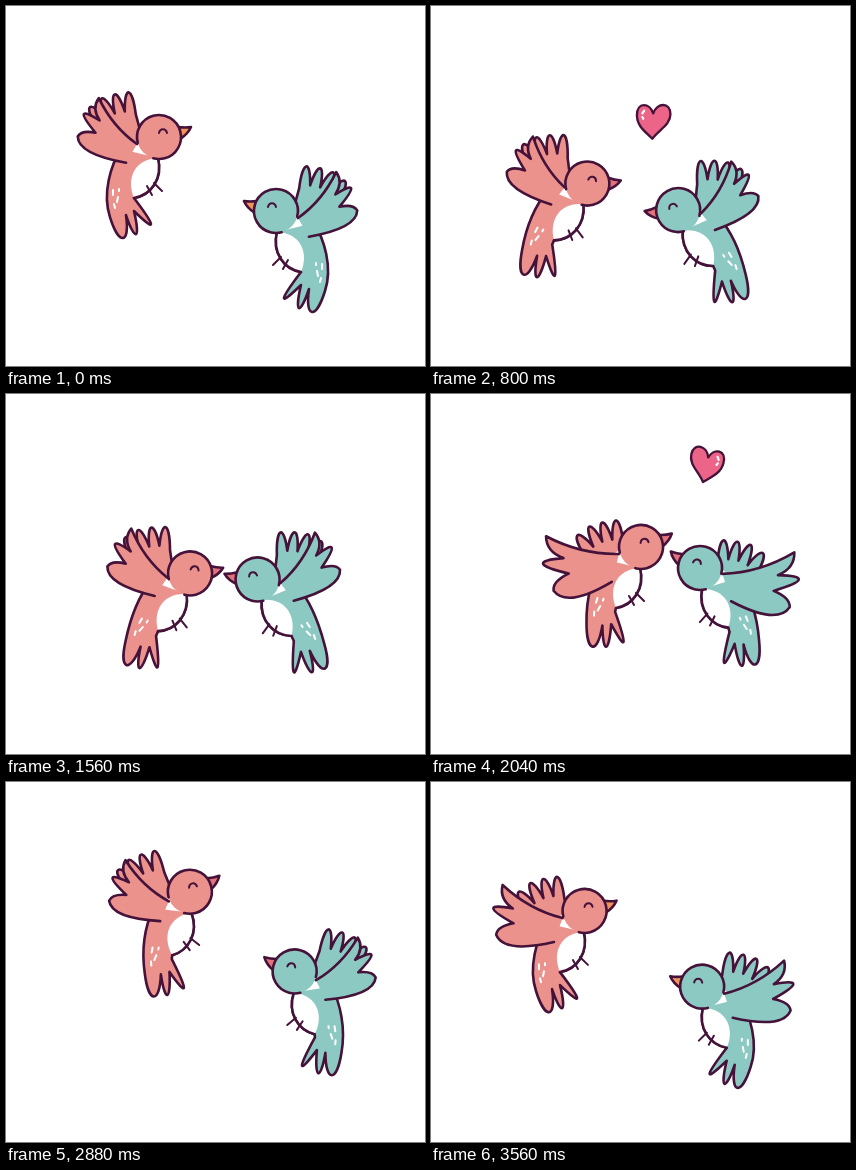
These frames come from a looping animation (419 px wide and 360 px high, 3600 ms). An HTML page with a canvas:

```html
<!DOCTYPE html>
<html lang="en">
<head>
<meta charset="utf-8">
<title>Two birds and a heart</title>
<style>
html, body { margin: 0; width: 100%; height: 100%; overflow: hidden; background: #fff; }
canvas { display: block; }
</style>
</head>
<body>
<canvas id="stage" width="419" height="360"></canvas>
<script>
const ctx = document.getElementById('stage').getContext('2d');
const LOOP = 3600, FLAP = 720, INK = '#45123a';

// Each key: time, head x, head y, body tilt, tail angle, head tilt (degrees)
const pinkKeys = [
  [0, 153, 131, 0, 0, 0], [520, 153, 159, 5, 17, 7], [1080, 163, 190, 10, 36, 15],
  [1720, 192, 173, 5, 27, 4], [2040, 210, 153, 0, 17.6, -6],
  [2520, 204, 116, -8, 14, -17], [3200, 165, 112, -4, 6.5, -4],
];
const tealKeys = [
  [0, 270, 205, 0, 0, 0], [520, 255, 207, 6, 20, 13], [1080, 243, 199, 12, 39, 21],
  [1720, 256, 181, 7, 30, 2], [2040, 269, 174, 3, 23, -12],
  [2520, 292, 179, -6, 12, -13], [3200, 281, 199, -2, 6, -3],
];
const wingKeys = [[0, 29], [50, 31], [340, 7.5], [560, -10], [680, 8]];

// Smooth periodic spline through the keys
function sample(keys, period, t) {
  const n = keys.length;
  const key = i => {
    const k = keys[(i + n) % n].slice();
    k[0] += period * Math.floor(i / n);
    return k;
  };
  let i = n - 1;
  while (keys[i][0] > t) i--;
  const [a, b, c, d] = [key(i - 1), key(i), key(i + 1), key(i + 2)];
  const h = c[0] - b[0], s = (t - b[0]) / h, blend = s * s * (3 - 2 * s);
  return b.slice(1).map((v, j) => {
    j++;
    const m0 = (c[j] - a[j]) / (c[0] - a[0]), m1 = (d[j] - b[j]) / (d[0] - b[0]);
    return v + (c[j] - v) * blend + h * s * (1 - s) * ((1 - s) * m0 - s * m1);
  });
}

const rad = deg => deg * Math.PI / 180;
function rotate(x, y, deg) {
  const c = Math.cos(rad(deg)), s = Math.sin(rad(deg));
  return [x * c - y * s, x * s + y * c];
}

const move = p => ctx.moveTo(...p);
const line = p => ctx.lineTo(...p);
const quad = (c, p) => ctx.quadraticCurveTo(...c, ...p);
const cubic = (c, d, p) => ctx.bezierCurveTo(...c, ...d, ...p);

// Rounded feather from one notch over its tip to the next notch
function feather(from, tip, to, width) {
  const mid = from.map((v, i) => (v + to[i]) / 2);
  const ctrl = p => p.map((v, i) => (4 * tip[i] - mid[i]) / 3 + width * (v - mid[i]));
  cubic(ctrl(from), ctrl(to), to);
}

function paint(fill, stroke = true) {
  if (fill) { ctx.fillStyle = fill; ctx.fill(); }
  if (stroke) ctx.stroke();
}

function dash(a, b) {
  ctx.beginPath();
  move(a);
  line(b);
  ctx.stroke();
}

function backWing(body, w, color) {
  const shift = (x, y) => body(x - 0.15 * (w - 8), y - 0.5 * (w - 8));
  const tips = [[-66, -19], [-54, -28], [-41, -32], [-27, -34]];
  const notches = [[-58, 2], [-50, -8], [-41, -13], [-31, -15], [-20, -12]];
  const n = notches.map(([x, y]) => shift(x, y));
  ctx.beginPath();
  move(body(-40, 15));
  line(n[0]);
  tips.forEach(([x, y], i) => feather(n[i], shift(x, y), n[i + 1], 0.75));
  line(body(-17, 0));
  paint(color);
}

function torso(body, tail, color) {
  const notches = [tail(-49, 80), tail(-33, 78), tail(-25, 74), tail(-25, 61)];
  const hip = body(-25, 61), chest = body(-1, 21);
  ctx.beginPath();
  move(body(-38, 12));
  cubic(body(-48, 28), tail(-57, 56), notches[0]);
  feather(notches[0], tail(-36, 101), notches[1], 0.7);
  feather(notches[1], tail(-23, 97), notches[2], 0.7);
  feather(notches[2], tail(-8, 87), notches[3], 0.4);
  line(hip);
  cubic(body(-8, 58), body(4, 42), chest);
  paint(color);

  ctx.beginPath();
  move(hip);
  cubic(body(-8, 58), body(4, 42), chest);
  cubic(body(-25, 22), body(-33, 42), hip);
  paint('#fff', false);
  ctx.beginPath();
  move(hip);
  cubic(body(-8, 58), body(4, 42), chest);
  ctx.stroke();

  ctx.lineWidth = 2;
  dash(body(-12, 49), body(-7, 58));
  dash(body(-5, 46), body(3, 54));
  ctx.strokeStyle = '#fff';
  dash(tail(-46, 53), tail(-46, 58));
  dash(tail(-41, 60), tail(-42, 65));
  dash(tail(-45, 67), tail(-44, 71));
  dash(tail(-40, 52), tail(-40, 54));
  ctx.strokeStyle = INK;
  ctx.lineWidth = 2.6;
}

function head(tilt, color, beak) {
  ctx.save();
  ctx.rotate(rad(tilt));
  ctx.beginPath();
  move([19, -10]);
  quad([26, -9], [32, -10]);
  quad([29, -3], [21, 2]);
  paint(beak);
  ctx.restore();

  ctx.beginPath();
  ctx.arc(0, 0, 22, 0, 7);
  paint(color, false);
  ctx.beginPath();
  ctx.arc(0, 0, 22, rad(165), rad(465));
  ctx.stroke();

  ctx.save();
  ctx.rotate(rad(tilt));
  ctx.lineWidth = 2;
  ctx.beginPath();
  move([0, -4]);
  cubic([1, -9], [7, -9], [8, -4]);
  ctx.stroke();
  ctx.restore();
}

function frontWing(body, w, color) {
  const length = 72 - 0.42 * w;
  const at = (r, deg) => {
    const a = rad(w + deg);
    return body(-22 - r * length * Math.cos(a), 7 - r * length * Math.sin(a));
  };
  const notch = at(0.74, 3), lower = at(0.72, -14);
  ctx.beginPath();
  move(body(-22, 7));
  quad(at(0.5, 6), at(1, 21));
  quad(at(0.97, 9), notch);
  feather(notch, at(1.02, 0), lower, 0.35);
  quad(at(0.96, -15), at(1, -22));
  quad(at(1, -39), body(-30 - 0.1 * w, 33 - 0.25 * w));
  paint(color);
}

function bird(keys, t, facing, color) {
  const [x, y, tilt, tailTilt, headTilt] = sample(keys, LOOP, t);
  const [w] = sample(wingKeys, FLAP, t % FLAP);
  const body = (px, py) => rotate(px, py, tilt);
  const pivot = body(-38, 60);
  const tail = (px, py) => rotate(px + 38, py - 60, tailTilt).map((v, i) => v + pivot[i]);
  const beak = t > 600 && t < 3400 ? '#e2737b' : '#f0945c';
  ctx.save();
  ctx.translate(x, y);
  ctx.scale(facing, 1);
  backWing(body, w, color);
  torso(body, tail, color);
  head(headTilt, color, beak);
  frontWing(body, w, color);
  ctx.restore();
}

function heart(t, born, end, x, y, size, flip, tilt) {
  if (t < born || t > end) return;
  const left = end - t;
  const scale = size * Math.min(1, (t - born) / 200, left / 60);
  ctx.save();
  ctx.translate(x - 0.03 * left, y + 0.128 * left);
  ctx.rotate(rad(tilt));
  ctx.scale(scale * flip, scale);
  ctx.beginPath();
  ctx.moveTo(0, -9);
  ctx.bezierCurveTo(-4, -21, -18, -22, -18, -7);
  ctx.bezierCurveTo(-18, 5, -9, 11, -1, 19);
  ctx.bezierCurveTo(6, 9, 19, 4, 19, -8);
  ctx.bezierCurveTo(19, -22, 4, -21, 0, -9);
  ctx.closePath();
  paint('#ec6588');
  ctx.strokeStyle = '#fff';
  ctx.lineWidth = 2.4;
  dash([-10, -12], [-12, -9]);
  dash([-12, -5], [-11, -3]);
  ctx.restore();
}

function draw() {
  const t = performance.now() % LOOP;
  ctx.clearRect(0, 0, 419, 360);
  ctx.lineWidth = 2.6;
  ctx.lineCap = ctx.lineJoin = 'round';
  ctx.strokeStyle = INK;
  heart(t, 620, 1360, 239, 44, 1, 1, 0);
  heart(t, 1560, 2300, 283, 38, 0.9, -1, 14);
  bird(pinkKeys, t, 1, '#ec928d');
  bird(tealKeys, t, -1, '#8bc9c2');
  requestAnimationFrame(draw);
}
draw();
</script>
</body>
</html>
```
